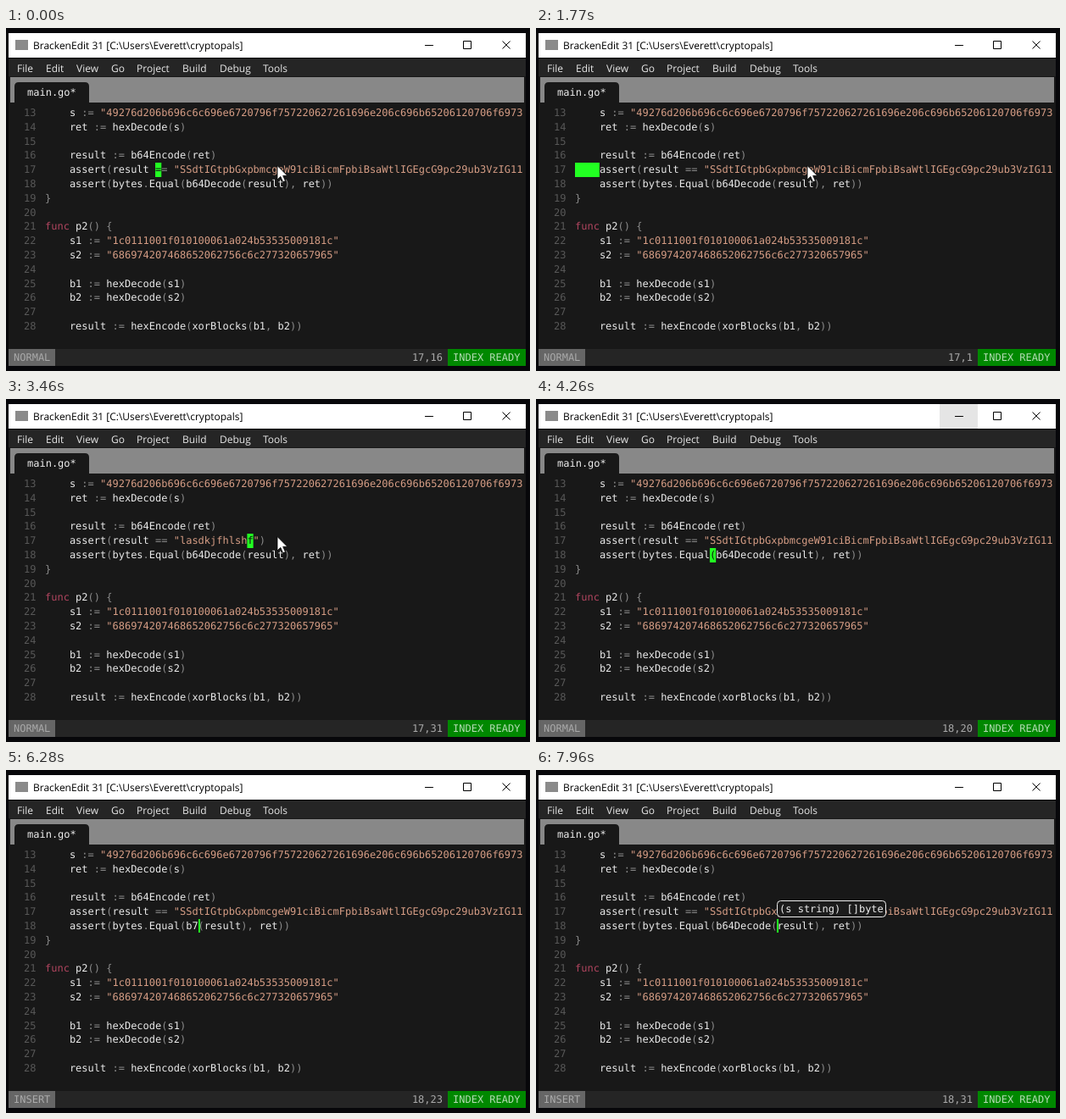
These frames come from a looping animation (618 by 405 pixels, 8000 ms). An HTML page:

```html
<!DOCTYPE html>
<html lang="en">
<head>
<meta charset="utf-8">
<title>Editor</title>
<style>
html, body { margin: 0; width: 618px; height: 405px; overflow: hidden; background: #07070a; }
svg { display: block; }
text { white-space: pre; text-rendering: geometricPrecision; }
.mono { font: 12px "DejaVu Sans Mono", monospace; }
.ui { font: 12px "Open Sans", sans-serif; }
.menu text { font-weight: 500; fill: #e8e8e8; }
</style>
</head>
<body>
<svg width="618" height="405" viewBox="0 0 618 405">
  <rect x="3" y="6" width="610" height="29" fill="#fff"/>
  <rect x="11" y="14" width="15" height="12" fill="#8a8a8a"/>
  <text class="ui" x="32" y="25" fill="#000">BrackenEdit 31 [C:\Users\Everett\cryptopals]</text>
  <rect id="hover" x="476" y="6" width="45" height="29" fill="#e5e5e5"/>
  <path d="M494 20.5h10M539.5 15.5h9v9h-9zM585.5 15.5l9 9M594.5 15.5l-9 9" fill="none" stroke="#000"/>
  <rect x="3" y="36" width="610" height="363" fill="#181818"/>
  <rect x="3" y="36" width="610" height="21" fill="#252525"/>
  <g id="menu" class="ui menu"></g>
  <rect x="5" y="58" width="606" height="30" fill="#888"/>
  <path d="M10 88V69q0-5 5-5h78q5 0 5 5v19z" fill="#181818"/>
  <text class="mono" x="25" y="80" fill="#eee">main.go*</text>
  <g id="code" class="mono"></g>
  <rect id="cursor" fill="#22ff22"/>
  <text id="under" class="mono" fill="#111"></text>
  <g id="tip" class="mono">
    <rect x="284.5" y="154.5" width="128" height="19" rx="4" fill="#1c1c1c" stroke="#eee"/>
    <text x="287" y="168" fill="#eee">(s string) []byte</text>
  </g>
  <path id="mouse" d="M320 162.5v16.5l3.8-3.6 2.9 6.4 2.8-1.2-2.8-6.2h5.2z" fill="#fff" stroke="#000" stroke-width=".8"/>
  <rect x="3" y="379" width="610" height="20" fill="#252525"/>
  <rect id="tag" x="3" y="379" height="20" fill="#666"/>
  <rect x="521" y="379" width="92" height="20" fill="#008800"/>
  <g class="mono">
    <text id="mode" x="9" y="393" fill="#aaa"></text>
    <text id="pos" x="515" y="393" text-anchor="end" fill="#aaa"></text>
    <text x="527" y="393" fill="#b4dcb4">INDEX READY</text>
  </g>
</svg>
<script>
const NS = "http://www.w3.org/2000/svg";
const $ = id => document.getElementById(id);
const CELL = 7.2246, LEFT = 46, FIRST = 13, LOOP = 8000;
const rowTop = row => Math.round(159 + (row - 17) * 16.8);
const baseline = row => Math.round(104 + (row - FIRST) * 16.8);
const cellX = n => LEFT + n * CELL;

function addText(parent, x, y, str, fill) {
  const el = document.createElementNS(NS, "text");
  el.setAttribute("x", x);
  el.setAttribute("y", y);
  if (fill) el.setAttribute("fill", fill);
  el.textContent = str;
  parent.appendChild(el);
}

[["File", 13], ["Edit", 47], ["View", 83], ["Go", 124], ["Project", 154],
 ["Build", 208], ["Debug", 252], ["Tools", 303]]
  .forEach(([name, x]) => addText($("menu"), x, 52, name));

const longText = "SSdtIGtpbGxpbmcgeW91ciBicmFpbiBsaWtlIGEgcG9pc29ub3VzIG11";
const line17 = str => `    assert(result == "${str}` + (str === longText ? "" : '")');
const line18 = call => `    assert(bytes.Equal(${call}result), ret))`;

const lines = [
  '    s := "49276d206b696c6c696e6720796f757220627261696e206c696b65206120706f6973',
  "    ret := hexDecode(s)",
  "",
  "    result := b64Encode(ret)",
  "",
  "",
  "}",
  "",
  "func p2() {",
  '    s1 := "1c0111001f010100061a024b53535009181c"',
  '    s2 := "686974207468652062756c6c277320657965"',
  "",
  "    b1 := hexDecode(s1)",
  "    b2 := hexDecode(s2)",
  "",
  "    result := hexEncode(xorBlocks(b1, b2))"
];

function colorOf(token) {
  if (token[0] === '"') return "#d69d85";
  if (token === "func") return "#b0455f";
  return /^\w/.test(token) ? "#eaeaea" : "#8c8c8c";
}

const rows = lines.map((line, i) => {
  addText($("code"), 21, baseline(FIRST + i), String(FIRST + i), "#585858");
  const g = document.createElementNS(NS, "g");
  $("code").appendChild(g);
  return { g, text: null };
});

function setLine(row, str) {
  const item = rows[row - FIRST];
  if (item.text === str) return;
  item.text = str;
  item.g.textContent = "";
  for (const m of str.matchAll(/"[^"]*"?|\w+|[^\s\w"]+/g))
    addText(item.g, cellX(m.index), baseline(row), m[0], colorOf(m[0]));
}
lines.forEach((line, i) => setLine(FIRST + i, line));

// Key strokes: each step overrides part of the editor state.
const steps = [];
const at = (t, change) => steps.push([t, change]);
const move = (t, row, col) => at(t, { row, col });
const typeString = (t, str) => at(t, { str, col: 20 + str.length });
const typeCall = (t, name) => at(t, { call: name + "(", col: 21 + name.length });

at(0, { mode: "NORMAL", row: 17, col: 16, str: longText, call: "b64Decode(",
        mouse: true, hover: false, tip: false });
move(720, 15, 1);
move(1050, 20, 1);
move(1510, 19, 1);
move(1640, 18, 1);
move(1770, 17, 1);
move(2040, 17, 2);
move(2170, 17, 8);
at(2580, { mode: "OPERATOR" });
at(2780, { mode: "INSERT", str: "", col: 20 });
typeString(2980, "l");
typeString(3050, "lasd");
typeString(3120, "lasdkjf");
typeString(3190, "lasdkjfhls");
typeString(3390, "lasdkjfhlshf");
at(3460, { mode: "NORMAL", col: 31 });
at(3590, { str: longText, col: 20 });
move(3860, 18, 20);
at(4260, { mouse: false, hover: true });
at(4470, { hover: false });
move(4800, 18, 21);
at(5130, { mode: "OPERATOR" });
at(5350, { mode: "INSERT", call: "(" });
typeCall(5480, "b");
typeCall(5680, "b7");
typeCall(5750, "b74");
typeCall(5820, "b74D");
typeCall(6150, "b74");
typeCall(6280, "b7");
typeCall(6410, "b");
typeCall(6480, "b64");
typeCall(6680, "b64D");
typeCall(6880, "b64De");
typeCall(7010, "b64Dec");
typeCall(7140, "b64Deco");
typeCall(7270, "b64Decod");
typeCall(7340, "b64Decode");
at(7540, { mode: "NORMAL", col: 29 });
move(7680, 18, 30);
at(7740, { call: "b64Decode" });
at(7810, { mode: "INSERT" });
at(7960, { call: "b64Decode(", col: 31, tip: true });

const show = (id, on) => $(id).setAttribute("visibility", on ? "visible" : "hidden");

function drawCursor(s) {
  const line = rows[s.row - FIRST].text;
  const cell = s.col === 1 ? 0 : s.col + 2;
  const x = cellX(cell), insert = s.mode === "INSERT";
  const onTab = s.col === 1 && line.startsWith("    ");
  const c = $("cursor");
  c.setAttribute("x", insert ? Math.round(x) : x);
  c.setAttribute("y", rowTop(s.row));
  c.setAttribute("width", insert ? 2 : CELL * (onTab ? 4 : 1));
  c.setAttribute("height", insert ? 16 : 17);
  const u = $("under");
  u.textContent = insert || onTab ? "" : line[cell] || "";
  u.setAttribute("x", x);
  u.setAttribute("y", baseline(s.row));
}

let shown = -1;
function draw(time) {
  const t = time % LOOP;
  const n = steps.filter(step => step[0] <= t).length;
  if (n !== shown) {
    shown = n;
    const s = Object.assign({}, ...steps.slice(0, n).map(step => step[1]));
    setLine(17, line17(s.str));
    setLine(18, line18(s.call));
    drawCursor(s);
    $("mode").textContent = s.mode;
    $("tag").setAttribute("width", 12 + Math.round(s.mode.length * CELL));
    $("pos").textContent = s.row + "," + s.col;
    ["mouse", "hover", "tip"].forEach(id => show(id, s[id]));
  }
}

let start = null;
function tick(now) {
  if (start === null) start = now;
  draw(now - start);
  requestAnimationFrame(tick);
}
draw(0);
requestAnimationFrame(tick);
</script>
</body>
</html>
```
